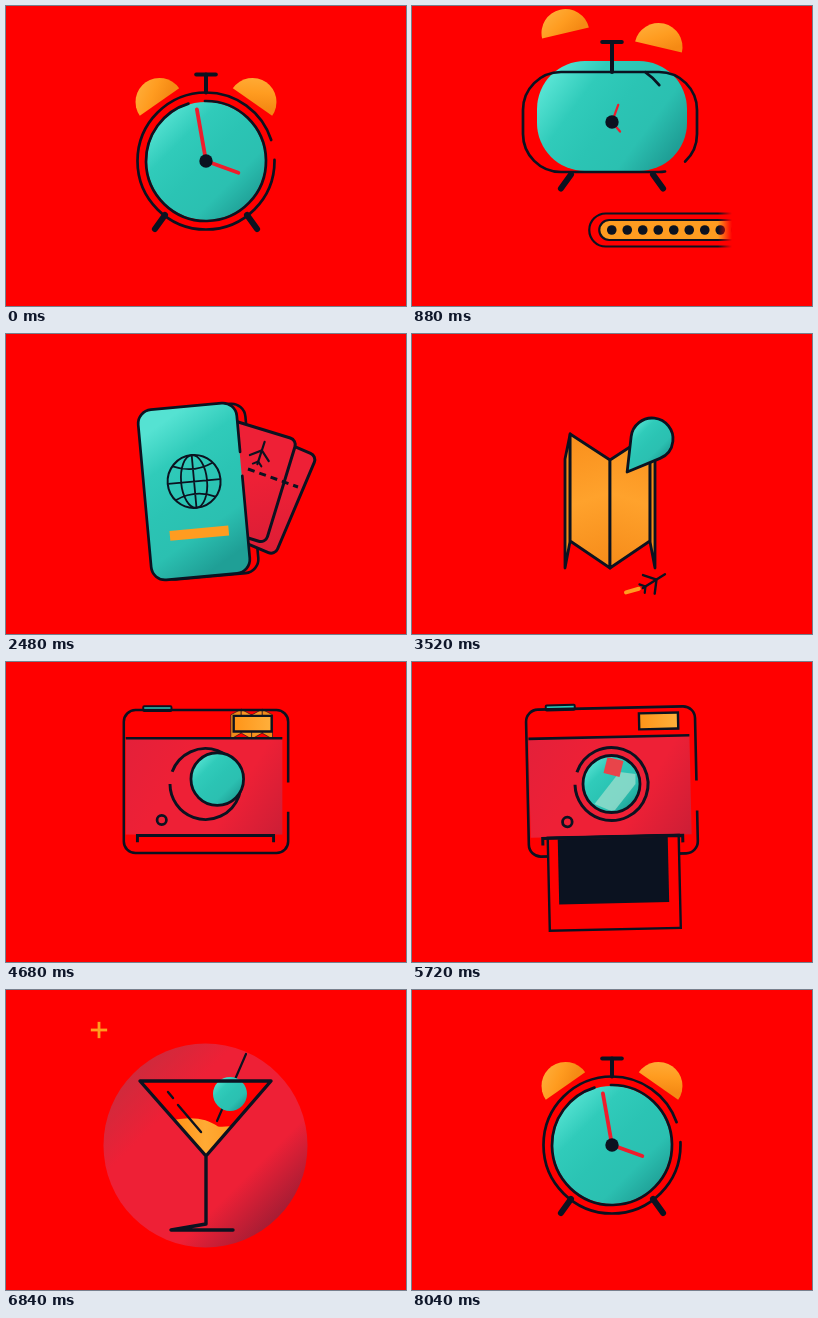
Animation of 400 by 300 pixels, one loop 8080 ms. Source, as an HTML page with a canvas:

```html
<!DOCTYPE html>
<html>
<head>
<meta charset="utf-8">
<style>
html, body { margin: 0; width: 100%; height: 100%; overflow: hidden; background: #f00; }
canvas { display: block; }
</style>
</head>
<body>
<canvas id="stage" width="400" height="300"></canvas>
<script>
const c = document.getElementById('stage').getContext('2d');
const RED = '#f00', INK = '#0b1220', CRIMSON = '#ee2036', ORANGE = '#ff9c20';
const LOOP = 8080, STEP = 40, SCENES = 6, RAD = Math.PI / 180;

// One teal shape becomes the next scene's: [x, y, width, height, radius, degrees, gap start]
const POSES = [
  { body: [200, 155, 118, 118, 59, 0], frame: [200, 155, 137, 137, 68.5, 0, 0.2] }, // clock
  { body: [200, 141, 150, 110, 48, 0], frame: [198, 147, 174, 100, 38, 0, 0.44] },  // suitcase
  { body: [188, 157.5, 98, 170, 14, -5.2], frame: [188, 157.5, 99, 171, 14, -5.2, 0.25] }, // passport
  { body: [240, 105, 42, 42, 21, 0], frame: [240, 105, 42, 42, 21, 0, 0.25] },      // map pin
  { body: [199.5, 122, 57, 57, 28.5, 0] },                                          // camera lens
  { body: [224, 104, 34, 34, 17, 0] }                                               // olive
];

let beat = 0; // scenes elapsed
let p = 0;    // beats since the current part's scene

const clamp = x => Math.min(1, Math.max(0, x));
const smooth = x => x * x * (3 - 2 * x);
const ramp = (a, b) => smooth(clamp((p - a) / (b - a)));
const bump = (a, b) => Math.sin(Math.PI * clamp((p - a) / (b - a)));
const lerp = (a, b, u) => a + (b - a) * u;

function pose(kind) {
  const i = Math.floor(beat), f = beat - i;
  const a = POSES[i][kind], b = POSES[(i + 1) % SCENES][kind];
  const u = smooth(clamp((f - 0.25) / 0.35));
  const now = a.map((v, j) => lerp(v, b[j], u));
  if (i === 0) now[1] -= 31 * hop();
  return now;
}
const hop = () => Math.sin(Math.PI * clamp((beat - 0.35) / 0.6));
const framePose = () => p < 0 ? POSES[0].frame : pose('frame');

function at(x, y, deg, scale, draw) {
  c.save();
  c.translate(x, y);
  c.rotate(deg * RAD);
  c.scale(scale, scale);
  draw();
  c.restore();
}
function paint(fill, stroke, width = 3) {
  if (fill) { c.fillStyle = fill; c.fill(); }
  if (stroke && width > 0) { c.strokeStyle = stroke; c.lineWidth = width; c.stroke(); }
}
function poly(pts, width, color = INK, fill, reveal = 1) {
  if (reveal <= 0) return;
  let len = 0;
  c.beginPath();
  pts.forEach(([x, y], i) => {
    c.lineTo(x, y);
    if (i) len += Math.hypot(x - pts[i - 1][0], y - pts[i - 1][1]);
  });
  if (reveal < 1) c.setLineDash([len * reveal, len]);
  paint(fill, color, width);
  if (reveal < 1) c.setLineDash([]);
}
function box(x, y, w, h, r, fill, stroke, width) {
  c.beginPath();
  c.roundRect(x, y, w, h, Math.min(r, w / 2, h / 2));
  paint(fill, stroke, width);
}
function disc(x, y, r, fill, stroke, width) {
  c.beginPath();
  c.arc(x, y, Math.max(0, r), 0, 7);
  paint(fill, stroke, width);
}
// Rounded outline with one gap; start and size are shares of its length
function gapBox(x, y, w, h, r, start, size, width) {
  const len = 2 * (w + h) - 8 * r + 2 * Math.PI * r;
  c.setLineDash([len * (1 - size), len * size]);
  c.lineDashOffset = -len * (start + size);
  box(x, y, w, h, r, null, INK, width);
  c.setLineDash([]);
}
function shade(x0, y0, x1, y1, ...stops) {
  const g = c.createLinearGradient(x0, y0, x1, y1);
  stops.forEach((s, i) => g.addColorStop(i / (stops.length - 1), s));
  return g;
}

function belt() {
  const left = lerp(321, 76, ramp(-0.5, -0.225));
  const w = lerp(345, 76, ramp(0.2, 0.5)) - left;
  if (w < 26 || p < -0.49) return;
  c.save();
  c.beginPath();
  c.rect(74, 200, 247, 45);
  c.clip();
  box(left, 207.5, w, 33, 16.5, null, INK, 2.2);
  box(left + 10, 214, w - 20, 20, 10, ORANGE, INK, 2.2);
  const shift = Math.max(0, p + 0.225) * 80 % 15.5;
  for (let x = left + 22.5 - shift; x < left + w - 14; x += 15.5)
    if (x > left + 14) disc(x, 224, 4.8, INK);
  c.fillStyle = shade(306, 0, 320, 0, 'rgba(255,0,0,0)', RED);
  c.fillRect(306, 200, 16, 45);
  c.restore();
}

function clockBack() {
  const [, y, , h] = framePose(), morph = ramp(0.25, 0.6);
  const size = ramp(-0.4, -0.1) - ramp(0.75, 0.9);
  const len = 14 * (ramp(-0.35, -0.08) - ramp(1.2, 1.35));
  c.lineCap = 'round';
  for (const side of [-1, 1]) {
    const toss = (side < 0 ? 30 : 16) * hop();
    if (size > 0) at(200 + side * 46.5, y - 59 - toss, side * lerp(35, 13, morph), size, () => {
      c.beginPath();
      c.arc(0, 0, 24, Math.PI, 0);
      paint(shade(-8, -24, 8, 2, '#ffab35', ORANGE, '#f58a14'));
    });
    const top = y + h / 2 + lerp(-14.5, 2.5, morph);
    if (len > 0) poly([[200 + side * 41, top], [200 + side * (41 + len * 0.72), top + len]], 6);
  }
}

function clockFront() {
  const [, y, , h] = framePose(), morph = ramp(0.25, 0.6);
  const grow = ramp(-0.38, -0.06), gone = ramp(0.7, 0.88);
  c.lineCap = 'round';
  if (grow > 0 && gone < 1) {
    const from = lerp(-91, -56, morph), to = lerp(253, -38, morph);
    c.beginPath();
    c.arc(200, y, 60, from * RAD, lerp(from, to, grow) * RAD);
    paint(null, INK, 2.7 * (1 - gone));
    const shrink = 1 - ramp(0.4, 0.82);
    const hand = (deg, len) => at(200, y, deg, 1, () =>
      poly([[0, 0], [len * shrink, 0]], 3.8 * Math.sqrt(shrink), '#f01c2c'));
    hand(lerp(-100, -70, morph) - 180 * (1 - grow), 52.5 * grow);
    hand(lerp(20, 50, morph) - 60 * (1 - grow), 36 * ramp(-0.35, 0.05));
    disc(200, y, 6.7 * grow * (1 - gone), INK);
  }
  const stem = ramp(-0.35, -0.08) - ramp(1.2, 1.35);
  if (stem > 0) {
    const foot = y - h / 2, top = foot - lerp(18, 30, morph) * stem;
    poly([[200, foot], [200, top]], 4);
    poly([[200 - 9.8 * stem, top], [200 + 9.8 * stem, top]], 4);
  }
}

function frame() {
  if (p < -0.4 || p > 2.6) return;
  const [x, y, w, h, r, deg, gap] = framePose();
  const size = lerp(1, 0.047, ramp(-0.4, -0.08));
  c.lineCap = 'round';
  at(x, y, deg, 1, () =>
    gapBox(-w / 2, -h / 2, w, h, r, gap + 0.15 * Math.min(p, 0), size, 2.7));
}

function plane(x, y, deg, scale) {
  at(x, y, deg, scale, () => {
    c.lineCap = 'round';
    poly([[-13, 0], [13, 0]], 2.4);
    poly([[-6, -11], [3, 0], [-6, 11]], 2.4);
    poly([[-14, -5], [-10, 0], [-14, 5]], 2.2);
  });
}

const passportOpen = () => ramp(-0.45, -0.2) - ramp(0.2, 0.35);

function tickets() {
  const k = passportOpen();
  if (k <= 0) return;
  const [x, y, w, h, r, deg] = pose('body');
  at(x, y, deg, 1, () => box(-w / 2 + 9 * k, -h / 2 + k, w, h, r, RED, INK, 2.6));
  c.lineCap = 'butt';
  const card = (x, y, deg, w) => at(x - (1 - k) * 85, y + (1 - k) * 10, deg * k, 1, () =>
    box(-w, 0, w, 108, 7, shade(-w, 0, 0, 108, CRIMSON, CRIMSON, '#dc1e36'), INK, 3));
  card(311, 122, 23, 80);
  card(291, 106, 17, 72);
  c.save();
  c.translate((k - 1) * 85, 0);
  c.setLineDash([7, 5]);
  poly([[242, 135], [292, 153]], 3);
  c.setLineDash([]);
  plane(255, 119, -72, 0.9);
  c.restore();
}

function map() {
  const grow = ramp(-0.8, -0.42), spread = ramp(-0.46, -0.1), leave = ramp(0.25, 0.5);
  if (!grow || leave === 1) return;
  const a = 39 * grow + 8 * spread, o = 47 * spread;
  at(lerp(198, 247, leave), lerp(166, 59, leave), 0, lerp(1, 0.2, leave), () => {
    c.lineJoin = 'round';
    for (const side of [-1, 1]) {
      const inner = side * a, outer = side * (a + o);
      poly([[inner, -66], [outer, -41], [outer, 68], [inner, 41], [inner, -66]], 2.8, INK, '#f08a1a');
      poly([[0, -40], [inner, -66], [inner, 41], [0, 68], [0, -40]], 2.8, INK,
        shade(inner, -66, 0, 64, '#f98f1c', '#ffa22c', '#f68c1a'));
    }
    c.lineJoin = 'miter';
  });
}

function flight() {
  const size = ramp(-0.9, -0.8) - ramp(0.05, 0.15);
  if (size <= 0) return;
  const spot = a => [198 + 88 * Math.cos(a), 164 + 96 * Math.sin(a)];
  const a = (60 - (p + 0.386) * 337) * RAD;
  c.lineCap = 'round';
  poly([spot(a + 0.34), spot(a + 0.19)], 4 * size, ORANGE);
  plane(...spot(a), Math.atan2(-96 * Math.cos(a), 88 * Math.sin(a)) / RAD, size);
}

function camera() {
  const size = ramp(-0.75, -0.5), leave = ramp(0.28, 0.65);
  if (!size || leave === 1) return;
  const tilt = -1.3 * ramp(-0.25, 0) + 14 * leave;
  at(199.5 + 300 * leave, 122, tilt, size, () => {
    c.lineCap = 'butt';
    box(-64, -80, 29, 5, 1, '#2cc6b6', INK, 2);
    gapBox(-84, -76, 169, 147, 12, 0.37, 0.049, 2.6);
    c.fillStyle = shade(-80, -47, 79, 52, '#e4203a', CRIMSON, CRIMSON, '#cc1e36');
    c.fillRect(-82, -47, 161, 99);
    poly([[-82, -47], [79, -47]], 2.6);
    box(29, -70, 39, 16, 0, shade(29, 0, 68, 0, '#ff9418', '#ffb03c'), INK, 2.4);
    disc(-45, 37, 4.8, null, INK, 2.8);
    c.beginPath();
    c.arc(0, 0, 36.5, 200 * RAD, 540 * RAD);
    paint(null, INK, 3);
    const out = 101 * ramp(-0.22, 0.35), drop = 150 * ramp(0.3, 0.6);
    c.save();
    c.beginPath();
    c.rect(-100, 51, 200, 300);
    c.clip();
    if (out > 0) box(-65, 52 + drop, 131, out + 1, 0, RED, INK, 2.4);
    if (out > 28) box(-55, 54 + drop, 110, out - 27, 0, INK);
    c.restore();
    poly([[-70, 60], [-70, 53], [70, 53], [70, 60]], 3);
  });
}

function inGlass(draw) {
  const size = 1 - ramp(0.25, 0.55);
  if (p > -0.25 && size > 0) at(200, 155, 0, size, () => {
    c.translate(-200, -155);
    draw();
  });
}

function cocktailBack() {
  const r = 102 * (ramp(-0.4, -0.1) - ramp(0.3, 0.65));
  if (r > 0) at(199.5, 155.5, 0, 1, () => disc(0, 0, r,
    shade(-r * 0.7, -r * 0.7, r * 0.7, r * 0.7, '#d02a3c', CRIMSON, CRIMSON, CRIMSON, '#a81d34')));
  inGlass(() => {
    const cone = [[134, 91], [265, 91], [200, 166]];
    c.save();
    c.globalAlpha = ramp(-0.25, -0.1);
    poly(cone, 0, INK, RED);
    c.clip();
    const fill = ramp(-0.2, 0.06), y = 168 - 33 * fill, wave = 5 * Math.cos((p - 0.079) * 9);
    c.beginPath();
    c.moveTo(130, y + wave);
    c.bezierCurveTo(175, y - wave * 2, 195, y - wave * 2, 212, y + wave * 0.3);
    c.quadraticCurveTo(222, y + wave * 0.6, 270, y - wave);
    c.lineTo(200, 170);
    if (fill > 0) paint(shade(170, 0, 228, 0, '#ff9418', '#ffaa34', ORANGE));
    c.restore();
    c.lineCap = 'round';
    poly([[240, 64], [211, 131]], 2.2, INK, null, ramp(-0.2, 0));
  });
}

function cocktailFront() {
  inGlass(() => {
    c.lineCap = c.lineJoin = 'round';
    poly([[200, 166], [134, 91], [265, 91], [200, 166], [200, 234], [165, 240], [227, 240]],
      3.4, INK, null, ramp(-0.25, 0.07));
    const shine = ramp(-0.05, 0.07);
    poly([[162, 102], [167, 108]], 2.4, INK, null, shine);
    poly([[172, 115], [195, 142]], 2.4, INK, null, shine);
  });
  const s = 14 * bump(0, 0.4);
  c.lineCap = 'butt';
  poly([[93 - s, 40], [93 + s, 40]], 2.8, ORANGE);
  poly([[93, 40 - s], [93, 40 + s]], 2.8, ORANGE);
}

function body() {
  const [x, y, w, h, r, deg] = pose('body');
  const teal = shade(-w * 0.38, -h * 0.38, w * 0.38, h * 0.38,
    '#55e2d2', '#30cbba', '#2bc4b4', '#2bc0b1', '#1f9f96');
  const tip = ramp(-0.55, -0.42) - ramp(0.25, 0.4);
  const edge = 2.8 * (ramp(-0.6, -0.42) - ramp(1.25, 1.4));
  at(x, y, deg, 1, () => {
    c.lineJoin = 'round';
    if (tip > 0) {
      const far = r * (1 + 0.97 * tip), half = Math.acos(r / far), aim = 127 * RAD;
      c.beginPath();
      c.arc(0, 0, r, aim + half, aim - half + 2 * Math.PI);
      c.lineTo(far * Math.cos(aim), far * Math.sin(aim));
      c.closePath();
      paint(teal, INK, edge);
    } else box(-w / 2, -h / 2, w, h, r, teal, INK, edge);
    c.lineJoin = 'miter';
  });
}

function passportPrint() {
  const [x, y, w, , , deg] = pose('body');
  const show = passportOpen();
  if (show > 0) at(x, y, deg, w / 98, () => {
    c.globalAlpha = show;
    disc(1, -10, 26.5, null, INK, 2);
    c.beginPath();
    c.ellipse(1, -10, 13, 26.5, 0, 0, 7);
    c.moveTo(1, -36); c.lineTo(1, 16);
    c.moveTo(-25, -10); c.lineTo(27, -10);
    c.moveTo(-19, -27); c.quadraticCurveTo(1, -18, 21, -27);
    c.moveTo(-19, 7); c.quadraticCurveTo(1, -2, 21, 7);
    paint(null, INK, 1.8);
    box(-28, 37, 59, 10, 0, ORANGE);
  });
}

function lensShine() {
  const show = ramp(-0.4, -0.25) - ramp(0.25, 0.33);
  if (show > 0) at(199.5, 122, 0, 1, () => {
    c.globalAlpha = show;
    c.beginPath();
    c.arc(0, 0, 26.5, 0, 7);
    c.clip();
    poly([[-17, 20], [8, -12], [24, -10], [24, 0], [2, 28]], 0, INK, 'rgba(165,225,208,.7)');
    poly([[-4, -27], [12, -23], [8, -7], [-8, -11]], 0, INK, '#e8444a');
  });
}

// Back to front, each with the scene it is timed by
const PARTS = [
  [belt, 1], [clockBack, 0], [tickets, 2], [map, 3], [flight, 3], [camera, 4], [cocktailBack, 5],
  [body, 3], [passportPrint, 2], [lensShine, 4], [frame, 0], [clockFront, 0], [cocktailFront, 5]
];

const begin = performance.now();
function draw() {
  const ms = (performance.now() - begin) % LOOP;
  beat = Math.floor(ms / STEP) * STEP / LOOP * SCENES;
  c.fillStyle = RED;
  c.fillRect(0, 0, 400, 300);
  for (const [part, scene] of PARTS) {
    p = (beat - scene + SCENES * 1.5) % SCENES - SCENES / 2;
    part();
  }
  requestAnimationFrame(draw);
}

// Scenes without an outline of their own reuse the shape itself
for (const s of POSES) s.frame = s.frame || [...s.body, 0];
draw();
</script>
</body>
</html>
```
